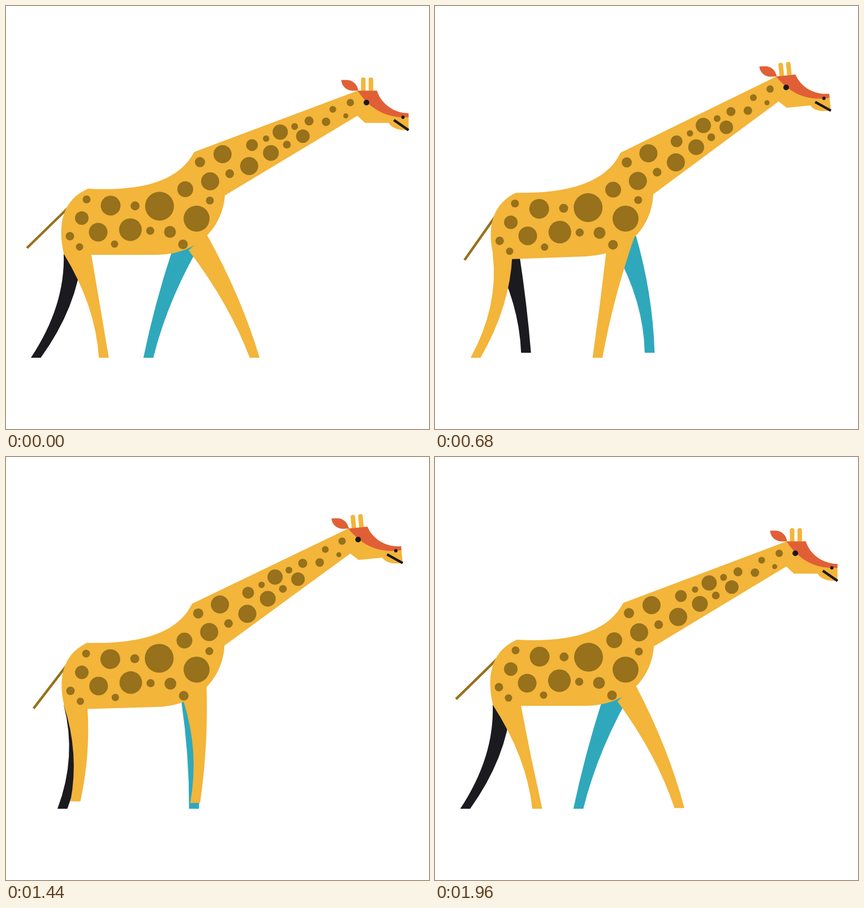
Write an HTML page with a canvas that moves like this. It is 748 px wide and 748 px high and loops after 2000 ms.

```html
<!DOCTYPE html>
<html lang="en">
<head>
<meta charset="utf-8">
<title>Walking giraffe</title>
<style>
html, body { margin: 0; height: 100%; overflow: hidden; background: #fff; }
canvas { display: block; width: 100vmin; height: 100vmin; }
</style>
</head>
<body>
<canvas id="stage" width="748" height="748"></canvas>
<script>
const ctx = document.getElementById('stage').getContext('2d');
const LOOP = 2000, HALF = LOOP / 2, STEP = 40, GROUND = 622;
const YELLOW = '#f3b53a', BROWN = '#97711b', RED = '#e15f36', BLACK = '#1b1a1f', TEAL = '#2fa8bc';

// Chains of spots (x, y, radius); wide gaps get a small filler dot
const CHAINS = [
  [[142.5, 342, 7], [185, 353, 17.5], [271.5, 354, 25.5], [317, 324, 14], [361, 310, 16],
    [430, 283, 16], [468.5, 260, 14], [525, 230.5, 12]],
  [[130, 426, 6.5], [113, 407, 7.5], [134, 375, 12], [163, 400, 16.5], [192, 421, 6.5],
    [220, 395.5, 20], [290, 399.5, 10.5], [313, 421.5, 8.5], [337, 376, 23], [360.5, 344, 7]],
  [[343, 276, 9], [383, 262, 16], [435, 246, 10.5], [485, 223, 13.5], [536, 203.5, 8],
    [566, 205, 7.5], [578, 183, 6], [601, 194.5, 4.5], [609, 171, 6.5]]
];

let sway = 0, lift = 0;

function turn([x, y], cx, cy, a) {
  const c = Math.cos(a), s = Math.sin(a);
  x -= cx; y -= cy;
  return [cx + x * c + y * s, cy - x * s + y * c];
}

// Bends the neck upward, then tilts the whole body
function pose(x, y) {
  const along = .7 * (x - y);
  const weight = Math.min(1, Math.max(0, (along - 25) / 75));
  return turn(turn([x, y], 382, 288, .096 * weight * lift), 337, 376, .049 * sway);
}

// Each segment holds 1 point (line) or 3 points (curve)
function shape(color, ...segments) {
  ctx.beginPath();
  segments.forEach((seg, i) => {
    const pts = [];
    for (let k = 0; k < seg.length; k += 2) pts.push(...pose(seg[k], seg[k + 1]));
    if (!i) ctx.moveTo(...pts);
    else if (pts.length > 2) ctx.bezierCurveTo(...pts);
    else ctx.lineTo(...pts);
  });
  ctx.fillStyle = color;
  ctx.fill();
}

function dot(color, x, y, r) {
  ctx.beginPath();
  ctx.arc(...pose(x, y), r, 0, 7);
  ctx.fillStyle = color;
  ctx.fill();
}

function line(color, width, cap, from, to) {
  ctx.beginPath();
  ctx.moveTo(...from);
  ctx.lineTo(...to);
  ctx.strokeStyle = color;
  ctx.lineWidth = width;
  ctx.lineCap = cap;
  ctx.stroke();
}

function leg(color, [lx, ly], [rx, ry], x, y, bowL, bowR) {
  const x2 = x + 17.5;
  ctx.beginPath();
  ctx.moveTo(lx, ly);
  ctx.quadraticCurveTo((lx + x) / 2 + 2 * bowL, (ly + y) / 2, x, y);
  ctx.lineTo(x2, y);
  ctx.quadraticCurveTo((rx + x2) / 2 + 2 * bowR, (ry + y) / 2, rx, ry);
  ctx.fillStyle = color;
  ctx.fill();
}

// The foot swings forward evenly from HALF to land, then slides back, slowing down
function gait(t, land, ease) {
  const swing = t >= HALF && t < land;
  if (swing) {
    const u = (t - HALF) / (land - HALF);
    return { swing, reach: u, rise: Math.sin(Math.PI * u) };
  }
  const u = (t - land + LOOP) % LOOP / (LOOP + HALF - land);
  return { swing, reach: (1 - u) ** ease, rise: 0 };
}

function frontLeg(color, t) {
  const { swing, reach, rise } = gait(t, LOOP, 1.46);
  const hip = reach ** (swing ? .45 : .7);
  leg(color, [294 + 29 * hip, 432], [354.5, 403], 243 + 188 * reach, GROUND - 10.5 * rise,
    12 * hip - 3 + 6 * rise, 17 * hip - 10 + 3 * rise);
}

function backLeg(color, t) {
  const { reach, rise } = gait(t, 1892, 1.62);
  leg(color, [102, 438], [134 + 20 * reach, 440], 44 + 142 * reach, GROUND - 13 * rise,
    16 - 4 * reach - 3 * rise, 14.5 - 17 * reach);
}

function ear() {
  const [x, y] = pose(623, 150);
  ctx.save();
  ctx.translate(x, y);
  ctx.rotate(.08 * lift);
  ctx.translate(-x, -y);
  shape(RED, [593, 131], [604, 131], [615, 132, 622, 141, 623, 150], [612, 150], [602, 149, 594, 143, 593, 131]);
  ctx.restore();
}

function head() {
  for (const x of [632, 645.5]) line(YELLOW, 8, 'round', pose(x, 130.5), pose(x, 152));
  ear();
  shape(YELLOW, [622, 150], [656, 150], [664, 175, 688, 190, 712, 190], [712, 219.5],
    [697, 221, 682, 217, 677, 207], [635, 207], [621, 194], [600, 170]);
  shape(RED, [622, 150], [656, 150], [664, 175, 688, 190, 712, 190], [712, 197], [675, 199, 645, 185, 622, 150]);
  dot(BLACK, 637.5, 171, 5);
  dot(BLACK, 702, 197, 3);
  line(BLACK, 4.5, 'butt', pose(686, 202), pose(712, 220));
}

function spots() {
  for (const chain of CHAINS) {
    chain.forEach(([x, y, r], i) => {
      dot(BROWN, x, y, r);
      if (!i) return;
      const [px, py, pr] = chain[i - 1];
      const gap = Math.hypot(x - px, y - py) - r - pr;
      if (gap > 30) dot(BROWN, (x + px) / 2, (y + py) / 2, gap / 5.5);
    });
  }
}

function draw(t) {
  const u = 1 - Math.abs(t / HALF - 1), opposite = (t + HALF) % LOOP;
  sway = u * u * (3 - 2 * u);
  lift = .5 - .5 * Math.cos(Math.PI * (t - 65) / HALF);
  ctx.fillStyle = '#fff';
  ctx.fillRect(0, 0, 748, 748);

  backLeg(BLACK, opposite);
  frontLeg(TEAL, opposite);
  line(BROWN, 4.5, 'butt', pose(118, 349), [37 + 20 * sway, 428 + 28 * sway]);
  backLeg(YELLOW, t);
  frontLeg(YELLOW, t);
  shape(YELLOW, [145, 323], [235, 328, 305, 312, 333, 258], [622, 150], [622, 194], [387, 335],
    [384, 385, 345, 440, 265, 440], [103, 440], [92, 395, 95, 345, 145, 323]);
  head();
  spots();
}

const begin = performance.now();
function tick() {
  const t = (performance.now() - begin) % LOOP;
  draw(Math.floor(t / STEP) * STEP);
  requestAnimationFrame(tick);
}
tick();
</script>
</body>
</html>
```
